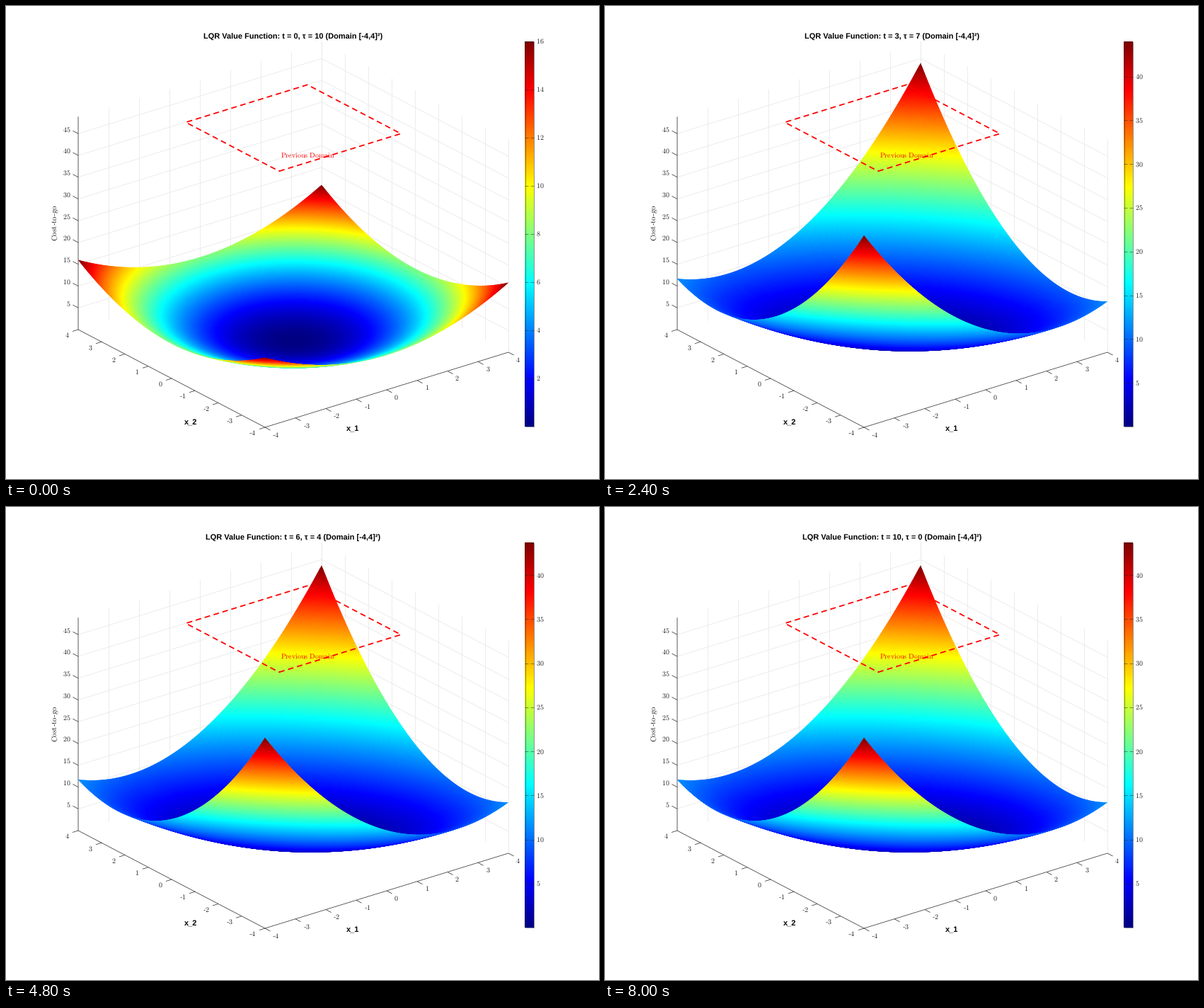
Write a matplotlib script that moves like this. It is 838 px wide and 668 px high and loops after 8800 ms.

```python
import numpy as np
import matplotlib.pyplot as plt
from matplotlib.animation import FuncAnimation
from matplotlib.collections import LineCollection, PolyCollection
from matplotlib.colors import ListedColormap

W, H, DPI = 838, 668, 64
PX = 72 / DPI                       # points per pixel
INK = "#262626"
ZMAX, ZSCALE = 48.9, 6.15
ZTICKS = range(5, 50, 5)
BAR_L, BAR_R, BAR_T, BAR_B = 733, 746, 50, 594

plt.rcParams.update({
    "mathtext.fontset": "cm",
    "font.family": "Liberation Sans",
    "text.hinting": "none",
})

# MATLAB-style jet
v = (np.arange(256) + 1) / 256
JET = ListedColormap(np.stack(
    [np.clip(1.5 - np.abs(4 * v - c), 0, 1) for c in (3, 2, 1)], axis=1))


def project(x, y, z=0):
    """Orthographic view of (x1, x2, cost) in pixels, y pointing down."""
    return np.stack([406 + 43 * x - 33 * y + 0 * z,
                     473 - 13.25 * x - 17.25 * y - ZSCALE * z], axis=-1)


def riccati(p):
    a, b, d = p
    return np.array([1 - b * b, a - b * d, 1 + 2 * b - d * d])


def solve(steps, sub=100):
    """Riccati solution (p11, p12, p22) at whole time steps, by RK4."""
    p, h, out = np.array([1.0, 0.0, 1.0]), 1 / sub, []
    for _ in range(steps):
        out.append(p)
        for _ in range(sub):
            k1 = riccati(p)
            k2 = riccati(p + h / 2 * k1)
            k3 = riccati(p + h / 2 * k2)
            k4 = riccati(p + h * k3)
            p = p + h / 6 * (k1 + 2 * k2 + 2 * k3 + k4)
    return out


STEPS = 11
P = solve(STEPS)

fig = plt.figure(figsize=(W / DPI, H / DPI), dpi=DPI, facecolor="white")
ax = fig.add_axes([0, 0, 1, 1])
ax.set_axis_off()


def roman(s, x, y, size=10, **kw):
    s = str(s).replace("-", "\u2010").replace(" ", r"\ ")
    kw = {"color": INK, "ha": "center", "va": "center", "zorder": 6} | kw
    return ax.text(x, y, rf"$\mathrm{{{s}}}$", fontsize=size * PX, **kw)


def bold(s, x, y):
    return ax.text(x, y, s, fontsize=11 * PX, weight="bold", color="black",
                   ha="center", va="baseline", zorder=6)


def lines(segs, color=INK, width=0.7, z=3):
    return ax.add_collection(LineCollection(
        segs, colors=color, linewidths=width * PX, zorder=z))


def draw_axes():
    grid, marks = [], []
    for i in range(-4, 5):
        grid.append([project(i, 4), project(i, 4, ZMAX)])
        grid.append([project(4, i), project(4, i, ZMAX)])
        px, py = project(i, -4), project(-4, i)
        marks += [[px, px + (7.5, 4)], [py, py + (-8, 2.5)]]
        roman(i, px[0] + 10.5, px[1] + 10.5, ha="left")
        roman(i, py[0] - 12.5, py[1] + 8, ha="right")
    for z in ZTICKS:
        grid.append([project(-4, 4, z), project(4, 4, z), project(4, -4, z)])
        p = project(-4, 4, z)
        marks.append([p, p + (-7.5, -4)])
        roman(z, p[0] - 10.5, p[1] - 6, ha="right")
    marks.append([project(4, -4), project(-4, -4), project(-4, 4),
                  project(-4, 4, ZMAX)])
    lines(grid, "#e8e8e8", 0.8, 1)
    lines(marks)
    bold("x_1", 490, 600)
    bold("x_2", 261, 592)
    roman("Cost-to-go", 70.5, 306, 11, rotation=90)


def draw_domain():
    x, y = project(np.array([-2, 2, 2, -2, -2]),
                   np.array([-2, -2, 2, 2, -2]), ZMAX).T
    ax.plot(x, y, color="red", lw=1.8 * PX, dashes=(4.4, 2.9),
            dash_capstyle="butt", zorder=4)
    roman("Previous Domain", 426, 211, color="red")


def draw_bar():
    ax.imshow(np.arange(256)[::-1, None], cmap=JET, aspect="auto",
              extent=(BAR_L, BAR_R, BAR_B, BAR_T), interpolation="nearest",
              zorder=2)
    l, r, t, b = BAR_L + 0.5, BAR_R - 0.5, BAR_T + 0.5, BAR_B - 0.5
    lines([[(l, t), (r, t), (r, b), (l, b), (l, t)]], width=0.5)


draw_axes()
draw_domain()
draw_bar()
ax.set_xlim(0, W)
ax.set_ylim(H, 0)

title = bold("", 405.7, 46.5)

N = 180
# Cells run from the far corner to the near one, so later ones cover earlier
axis = np.linspace(4, -4, N)
X, Y = np.meshgrid(axis, axis, indexing="ij")
surface = PolyCollection([], linewidths=0, edgecolors="none", zorder=2)
ax.add_collection(surface, autolim=False)
bar_marks = []


def corners(a, reach=1):
    """Four corners of every cell; a longer reach tucks it under the next."""
    i = np.arange(N - 1)
    j = np.minimum(i + reach, N - 1)
    return np.stack([a[np.ix_(r, c)]
                     for r, c in ((i, i), (j, i), (j, j), (i, j))], axis=2)


def update(t):
    a, b, d = P[t]
    Z = 0.5 * (d * X**2 + 2 * b * X * Y + a * Y**2)
    top = Z.max()

    surface.set_verts(corners(project(X, Y, Z), reach=2).reshape(-1, 4, 2))
    surface.set_facecolor(JET(corners(Z).mean(axis=2).ravel() / top))

    title.set_text(f"LQR Value Function: t = {t}, τ = {10 - t} (Domain [-4,4]²)")

    while bar_marks:
        bar_marks.pop().remove()
    step = 2 if top < 20 else 5
    ticks = []
    for n in range(step, int(top + 1e-6) + 1, step):
        y = BAR_B - (BAR_B - BAR_T) * n / top
        ticks += [[(BAR_L, y), (BAR_L + 5, y)], [(BAR_R - 5, y), (BAR_R, y)]]
        bar_marks.append(roman(n, 749, y, ha="left"))
    bar_marks.append(lines(ticks, width=0.5))
    return []


anim = FuncAnimation(fig, update, frames=STEPS, interval=800,
                     init_func=lambda: [], repeat=True, repeat_delay=0,
                     blit=False)
plt.show()
```
